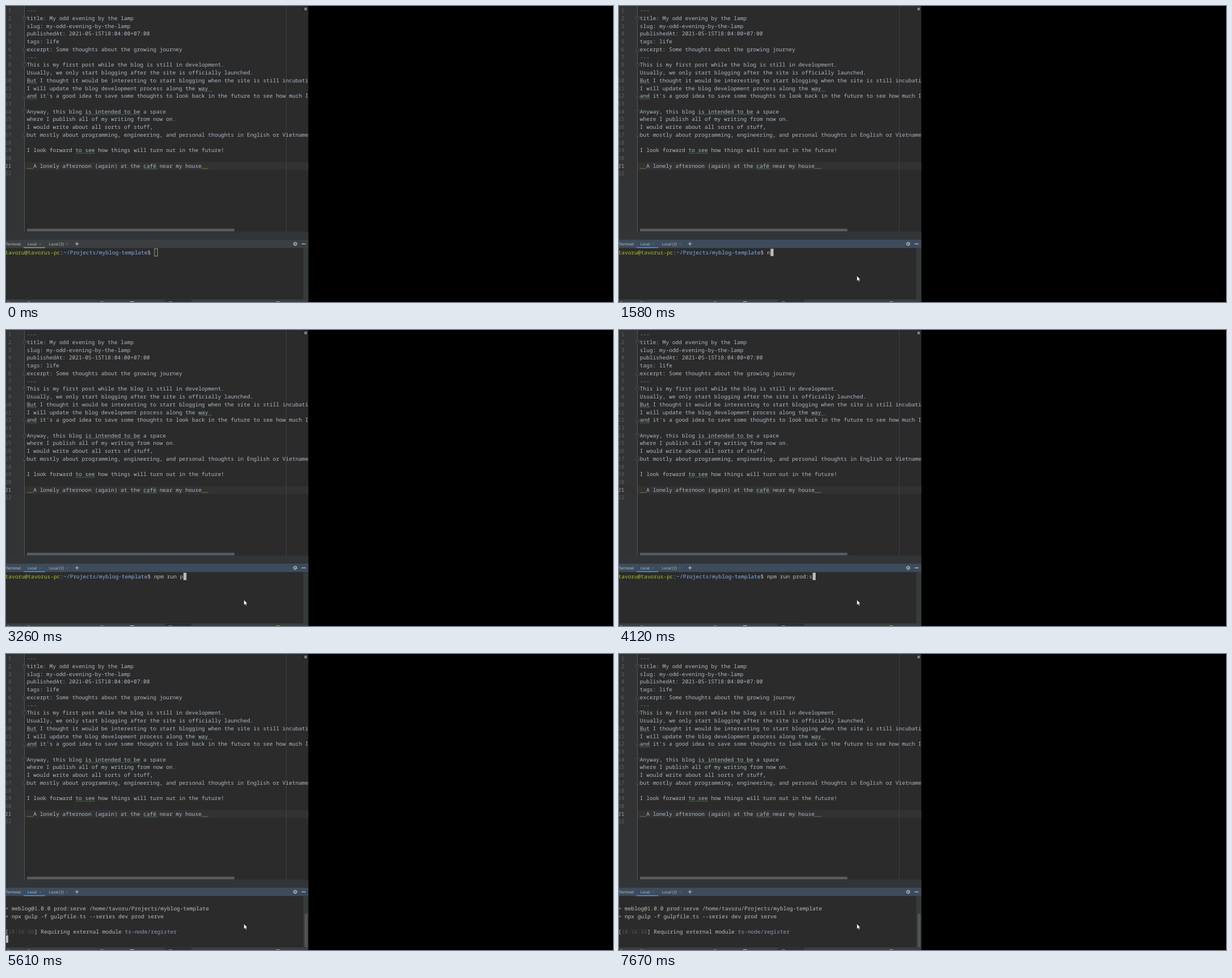
An HTML page for the animation above (8 s loop, 1071x523 px).

```html
<!DOCTYPE html>
<html lang="en">
<head>
<meta charset="utf-8">
<title>Terminal session</title>
<style>
  html, body { margin: 0; width: 100%; height: 100%; overflow: hidden; background: #000; }
  svg { display: block; }
  text { white-space: pre; text-rendering: geometricPrecision; }
  .mono { font: 9.53px "Noto Sans Mono", "DejaVu Sans Mono", monospace; fill: #a9b7c6; font-variant-ligatures: none; }
  .ui { font: 6.7px Roboto, "Noto Sans", sans-serif; fill: #bbb; }
  .num { fill: #606366; text-anchor: end; }
  .num.on { fill: #a4a3a3; }
  .dash { fill: #7d858d; }
  .mark { fill: #a87e2c; }
  .user { fill: #a8c023; }
  .path { fill: #7eaef1; }
  .time { fill: #555; }
  .module { fill: #a58fb5; }
  .out { fill: #bbb; }
  .wave { fill: none; stroke: #4f8a5f; stroke-width: .7; }
  .fold { fill: #2b2b2b; stroke: #5a5c5e; stroke-width: .7; }
  .cross { stroke: #6e7173; stroke-width: .7; }
  .icon { stroke: #c4c6c8; stroke-width: 1.1; fill: none; }
</style>
</head>
<body>
<svg width="1071" height="523" viewBox="0 0 1071 523">
  <defs><clipPath id="screen"><rect width="533.4" height="523"/></clipPath></defs>
  <rect width="1071" height="523"/>
  <g clip-path="url(#screen)">
    <rect width="534" height="523" fill="#2b2b2b"/>
    <rect width="32.5" height="399" fill="#313335"/>
    <rect y="276" width="534" height="13.7" fill="#323232"/>
    <path d="M32.5 0V399" stroke="#5a5c5e" stroke-width=".9"/>
    <path d="M494.5 0V399" stroke="#424446" stroke-width=".9"/>
    <g id="editor"></g>
    <path d="M527.6 3V7.6M529.9 3V7.6" stroke="#c4c6c8" stroke-width="1.2"/>
    <rect x="37" y="393.6" width="366" height="4.6" fill="#595b5c"/>
    <rect y="398.6" width="534" height="14.4" fill="#323537"/>

    <rect id="header" y="413" width="534" height="14.6"/>
    <rect id="tab" x="31" y="426" width="38" height="1.8"/>
    <text class="ui" x="-.3" y="422.8">Terminal:</text>
    <text class="ui" x="38" y="422.8">Local</text>
    <text class="ui" x="76" y="422.8">Local (2)</text>
    <path class="cross" d="M58.6 418.6l3.6 3.6m0-3.6l-3.6 3.6M106 418.6l3.6 3.6m0-3.6l-3.6 3.6"/>
    <path class="icon" d="M122 420.2h6.4M125.2 417v6.4M521.6 420.4h7"/>
    <circle class="icon" cx="510.2" cy="420.2" r="2" stroke-width="1.6"/>
    <circle class="icon" cx="510.2" cy="420.2" r="3.2" stroke-dasharray="1.6 1.75"/>

    <rect x="524.5" y="427.8" width="9.5" height="91" fill="#373a3c"/>
    <rect id="thumb" x="527" y="459" width="5" height="59" fill="#525455"/>
    <g id="shell"></g>
    <rect id="caret" width="5.3" height="13"/>

    <rect y="518.5" width="534" height="4.5" fill="#3c3f41"/>
    <rect x="280" y="519" width="47" height="4" fill="#2d2f30"/>
    <path d="M2 522.5h4M38 522.5h4M167 522.5h5M287 522.5h6" stroke="#85888a"/>
    <path d="M219 522.5h7" stroke="#c4c6c8"/>
    <path d="M477 522.5h6" stroke="#c9a92c"/>
  </g>
  <circle id="halo" cx="419.3" cy="476.4" r="7" fill="#97950f"/>
  <path id="mouse" d="M0 0V9.2L2.1 7.3L3.5 10.5L5 9.8L3.6 6.7H6.2Z" fill="#fff" stroke="#111" stroke-width=".5"/>
</svg>
<script>
const $ = id => document.getElementById(id);
const CELL = 5.718, ROW = 13.72, LEFT = 36.8, SHELL_LEFT = -1.5, LOOP = 8000;

const span = (cls, s) => `<tspan class="${cls}">${s}</tspan>`;
const line = (x, y, s, cls = '') => `<text class="mono ${cls}" x="${x}" y="${y}">${s}</text>`;
const baseline = n => 11.3 + ROW * (n - 1);

const post = [
  span('dash', '---'),
  'title: My odd evening by the lamp',
  'slug: my-odd-evening-by-the-lamp',
  'publishedAt: 2021-05-15T18:04:00+07:00',
  'tags: life',
  'excerpt: Some thoughts about the growing journey',
  span('dash', '---'),
  'This is my first post while the blog is still in development.',
  'Usually, we only start blogging after the site is officially launched.',
  'But I thought it would be interesting to start blogging when the site is still incubating',
  'I will update the blog development process along the way ',
  "and it's a good idea to save some thoughts to look back in the future to see how much I",
  '',
  'Anyway, this blog is intended to be a space',
  'where I publish all of my writing from now on.',
  'I would write about all sorts of stuff,',
  'but mostly about programming, engineering, and personal thoughts in English or Vietnamese',
  '',
  'I look forward to see how things will turn out in the future!',
  '',
  span('mark', '__') + 'A lonely afternoon (again) at the café near my house' + span('mark', '__'),
  ''
];

// Grammar hints: row, first column, length
const hints = [[10, 0, 3], [11, 53, 4], [12, 0, 3], [14, 18, 17], [19, 15, 6], [21, 36, 4]];

function wave([row, col, len]) {
  let d = `M${LEFT + col * CELL} ${baseline(row) + 2.4}`;
  for (let i = 0; i < len * CELL / 1.5; i++) d += `l1.5 ${i % 2 ? 1 : -1}`;
  return `<path class="wave" d="${d}"/>`;
}

function fold(row, up) {
  const y = baseline(row) - 3, s = up ? -1 : 1;
  return `<path class="fold" d="M30 ${y - 3 * s}h5.6v${4 * s}l-2.8 ${2.4 * s}l-2.8 ${-2.4 * s}z"/>
    <path class="fold" d="M31.4 ${y - .4 * s}h2.8"/>`;
}

$('editor').innerHTML =
  [2, 8, 14].map(r => fold(r, false)).join('') + [6, 12, 17].map(r => fold(r, true)).join('') +
  post.map((s, i) =>
    line(9.4, baseline(i + 1), i + 1, i === 20 ? 'num on' : 'num') + line(LEFT, baseline(i + 1), s)
  ).join('') + hints.map(wave).join('');

const prompt = span('user', 'tavoru@tavorus-pc') + ':' + span('path', '~/Projects/myblog-template') + '$ ';
const PROMPT_LEN = 46;
const command = 'npm run prod:serve';
// Moment each character is typed
const keys = [1580, 1790, 1990, 2390, 2590, 2660, 2860, 3060, 3260,
  3390, 3590, 3720, 3920, 4120, 4210, 4380, 4740, 4740];
const output = [
  '',
  '&gt; meblog@1.0.0 prod:serve /home/tavoru/Projects/myblog-template',
  '&gt; npx gulp -f gulpfile.ts --series dev prod serve',
  ''
];
const log = '[' + span('time', '18:16:56') + '] Requiring external module ' + span('module', 'ts-node/register');

const show = (el, on) => el.setAttribute('visibility', on ? 'visible' : 'hidden');
const between = (t, a, b) => t >= a && t < b;
let shown = '';

function drawShell(t) {
  const typed = keys.filter(k => k <= t).length;
  let rows = [prompt + command.slice(0, typed)];
  let col = PROMPT_LEN + typed, row = 0;
  if (t >= 5010) { col = 0; row = 1; }
  if (t >= 5210) { rows = rows.concat(output); row = 5; }
  if (t >= 5610) rows = rows.slice(1).concat(log);

  const html = rows.map((s, i) => line(SHELL_LEFT, 439.2 + ROW * i, s, 'out')).join('');
  if (html !== shown) $('shell').innerHTML = shown = html;

  const caret = $('caret'), filled = t >= 730;
  caret.setAttribute('x', SHELL_LEFT + col * CELL + (filled ? .1 : .5));
  caret.setAttribute('y', 428.9 + (row ? ROW * row - .3 : 0));
  caret.setAttribute('fill', filled ? '#bbb' : 'none');
  caret.setAttribute('stroke', filled ? 'none' : '#bbb');
  caret.setAttribute('stroke-width', .8);
  show(caret, !between(t, 1250, 1580) && !between(t, 6610, 7140) && t < 7670);
  show($('thumb'), t >= 5610);
}

function drawMouse(t) {
  const step = Math.min(5, Math.floor((t - 250) / 68));
  const rest = (1 - step / 5) ** 2;
  $('mouse').setAttribute('transform', `translate(${419.8 + 182 * rest} ${476.8 + 29.5 * rest})`);
  show($('mouse'), t >= 250);
  show($('halo'), between(t, 730, 790));
}

function draw(t) {
  const focus = t >= 790;
  $('header').setAttribute('fill', focus ? '#3d4b5c' : '#3c3f41');
  $('tab').setAttribute('fill', focus ? '#4a88c7' : '#85898c');
  drawShell(t);
  drawMouse(t);
}

const start = performance.now();
function tick() {
  draw((performance.now() - start) % LOOP);
  requestAnimationFrame(tick);
}
tick();
</script>
</body>
</html>
```
